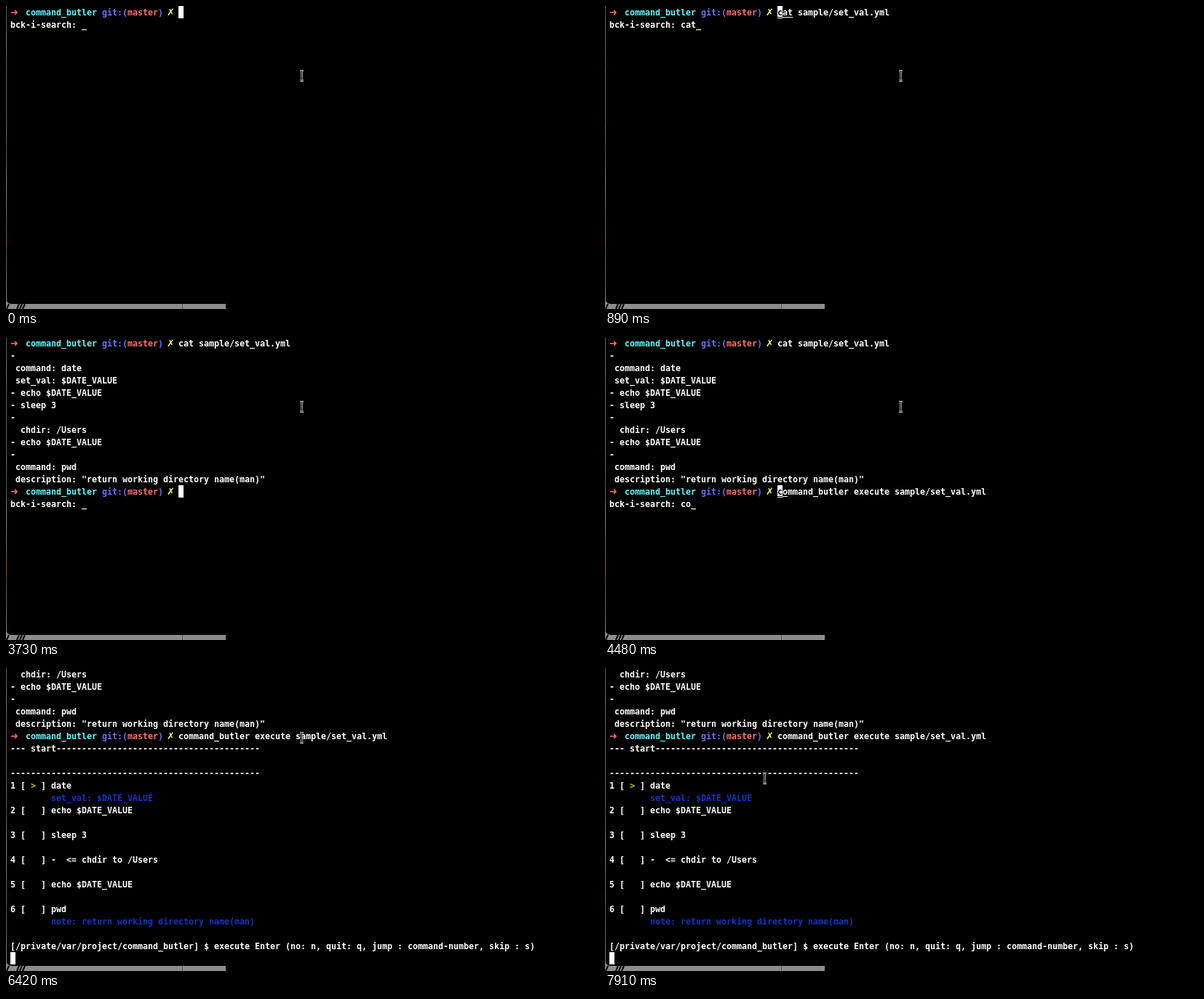
An HTML page with a canvas that plays this animation: 815 by 417 pixels, repeating every 8 s.

```html
<!DOCTYPE html>
<html lang="en">
<head>
<meta charset="utf-8">
<title>Terminal session</title>
<style>
html, body { margin: 0; width: 100%; height: 100%; overflow: hidden; background: #000; }
canvas { display: block; }
</style>
</head>
<body>
<canvas id="stage" width="815" height="417"></canvas>
<script>
const ctx = document.getElementById('stage').getContext('2d');
const LOOP = 8000;
const LEFT = 6, CELL = 7, LINE = 17, BASE = 13, INPUT = 33;
const MONO = 'bold 11.63px "DejaVu Sans Mono", monospace';
const SYMBOL = '13px "DejaVu Sans", sans-serif';
const WHITE = '#fff', RED = '#ff6e67', CYAN = '#5ffdff', PURPLE = '#6871ff',
      YELLOW = '#fffc67', BLUE = '#1035c8', OLIVE = '#c7c400';

const CAT = 'cat sample/set_val.yml';
const RUN = 'command_butler execute sample/set_val.yml';
const TAIL = [
  '  chdir: /Users', '- echo $DATE_VALUE', '-', ' command: pwd',
  ' description: "return working directory name(man)"'
];
const LISTING = [
  '-', ' command: date', ' set_val: $DATE_VALUE', '- echo $DATE_VALUE',
  '- sleep 3', '-', ...TAIL
];
const PLAN = [
  '--- start' + '-'.repeat(40), '', '-'.repeat(49),
  '1 [   ] date', '', '2 [   ] echo $DATE_VALUE', '',
  '3 [   ] sleep 3', '', '4 [   ] -  <= chdir to /Users', '',
  '5 [   ] echo $DATE_VALUE', '', '6 [   ] pwd', '', '',
  '[/private/var/project/command_butler] $ execute Enter (no: n, quit: q, jump : command-number, skip : s)'
];

const colX = col => LEFT + col * CELL;

function write(text, col, row, color = WHITE) {
  ctx.font = MONO;
  ctx.fillStyle = color;
  [...text].forEach((ch, i) => {
    if (ch !== ' ') ctx.fillText(ch, colX(col + i), row * LINE + BASE);
  });
}

function symbol(ch, x, row, color) {
  ctx.font = SYMBOL;
  ctx.fillStyle = color;
  ctx.fillText(ch, x, row * LINE + BASE);
}

function block(col, row) {
  ctx.fillStyle = WHITE;
  ctx.fillRect(colX(col), row * LINE, CELL, LINE);
}

const writeLines = (lines, row) => lines.forEach((s, i) => write(s, 0, row + i));

function prompt(row, command = '') {
  symbol('➜', LEFT, row, RED);
  write('command_butler', 3, row, CYAN);
  write('git:(', 18, row, PURPLE);
  write('master', 23, row, RED);
  write(')', 29, row, PURPLE);
  symbol('✗', colX(31) - 2, row, YELLOW);
  write(command, INPUT, row);
}

// Reverse history search: the matched part is underlined, its first cell is the cursor.
function search(row, query, match) {
  prompt(row, match);
  block(INPUT, row);
  if (query) {
    write(match[0], INPUT, row, '#000');
    const y = row * LINE + 15;
    ctx.fillStyle = '#000';
    ctx.fillRect(colX(INPUT), y, CELL, 1);
    ctx.fillStyle = WHITE;
    ctx.fillRect(colX(INPUT + 1), y, (query.length - 1) * CELL, 1);
  }
  write('bck-i-search: ' + query + '_', 0, row + 1);
}

function history() {
  prompt(0, CAT);
  writeLines(LISTING, 1);
}

function secondSearch(query, match) {
  history();
  search(12, query, match);
}

function plan() {
  writeLines(TAIL, 0);
  prompt(5, RUN);
  writeLines(PLAN, 6);
  write('>', 4, 9, OLIVE);
  write('set_val: $DATE_VALUE', 8, 10, BLUE);
  write('note: return working directory name(man)', 8, 20, BLUE);
  block(0, 23);
}

const SCENES = [
  [0, () => search(0, '', '')],
  [140, () => search(0, 'c', CAT)],
  [290, () => search(0, 'ca', CAT)],
  [890, () => search(0, 'cat', CAT)],
  [1790, () => { history(); prompt(12); block(INPUT, 12); }],
  [3730, () => secondSearch('', '')],
  [4180, () => secondSearch('c', CAT)],
  [4480, () => secondSearch('co', RUN)],
  [4620, () => secondSearch('command_butler exe', RUN)],
  [5820, () => { history(); prompt(12, RUN); block(0, 13); }],
  [6420, plan]
];

const POINTER = [
  [0, 406.5, 96], [7470, 393.5, 96], [7610, 327.5, 101],
  [7760, 271.5, 127], [7910, 219.5, 152]
];

const latest = (steps, t) => steps.filter(s => s[0] <= t).pop();

function iBeam(x, y) {
  const shape = new Path2D();
  for (const d of [-1, 1]) {
    shape.moveTo(x - 2.5, y + d * 7);
    shape.quadraticCurveTo(x, y + d * 7, x, y + d * 5);
    shape.quadraticCurveTo(x, y + d * 7, x + 2.5, y + d * 7);
  }
  shape.moveTo(x, y - 5);
  shape.lineTo(x, y + 5);
  shape.moveTo(x - 1.5, y + 3);
  shape.lineTo(x + 1.5, y + 3);
  for (const [width, color] of [[2.4, '#ddd'], [0.9, '#000']]) {
    ctx.lineWidth = width;
    ctx.strokeStyle = color;
    ctx.stroke(shape);
  }
}

// Slivers of the desktop showing past the window's left and bottom edges.
function desktop() {
  const strip = ctx.createLinearGradient(0, 0, 0, 417);
  const tones = [
    [0, '#555'], [45, '#777'], [78, '#666'], [82, '#1d6b50'], [86, '#666'],
    [150, '#666'], [157, '#28765a'], [165, '#777'], [200, '#555'],
    [240, '#888'], [305, '#666'], [312, '#a06010'], [324, '#a06010'],
    [330, '#555'], [417, '#888']
  ];
  tones.forEach(([y, color]) => strip.addColorStop(y / 417, color));
  ctx.fillStyle = strip;
  ctx.fillRect(0, 0, 1, 410);

  ctx.fillStyle = '#8c8c8c';
  ctx.fillRect(0, 410, 302, 7);
  ctx.beginPath();
  ctx.moveTo(0, 402);
  ctx.quadraticCurveTo(1, 410, 8, 410);
  ctx.lineTo(0, 410);
  ctx.fill();
  ctx.fillStyle = '#555';
  ctx.fillRect(242, 410, 1, 7);

  ctx.strokeStyle = '#000';
  ctx.lineWidth = 2;
  ctx.beginPath();
  for (const x of [2, 16, 20, 24]) {
    ctx.moveTo(x - 1, 417);
    ctx.lineTo(x + 2, 410);
  }
  ctx.stroke();
}

function draw(now) {
  const t = now % LOOP;
  ctx.fillStyle = '#000';
  ctx.fillRect(0, 0, 815, 417);
  desktop();
  latest(SCENES, t)[1]();
  const [, x, y] = latest(POINTER, t);
  iBeam(x, y);
}

const start = performance.now();
function tick() {
  draw(performance.now() - start);
  requestAnimationFrame(tick);
}
tick();
</script>
</body>
</html>
```
